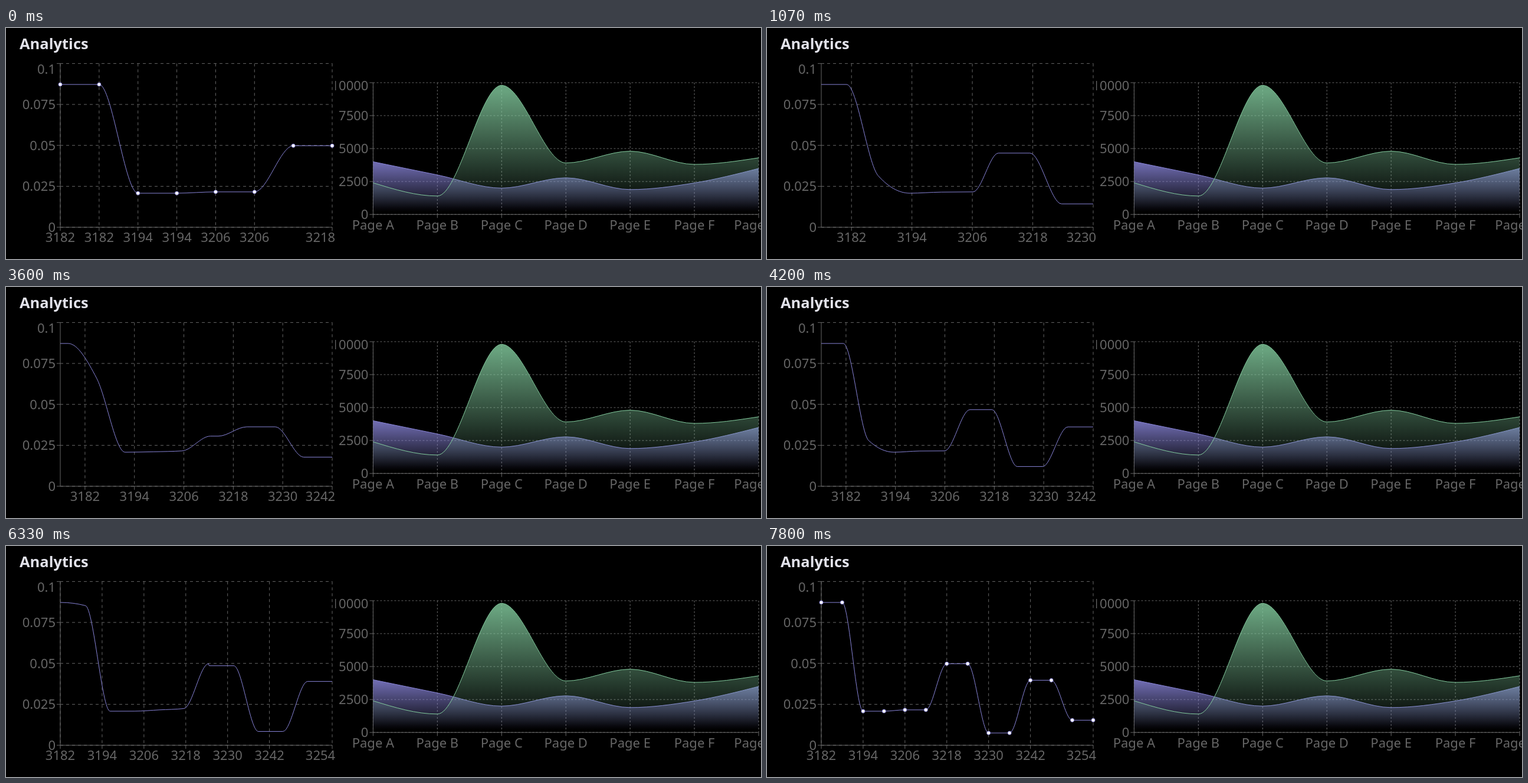
Recreate the animation shown at these times as an HTML page with a canvas. Size 1280x393 px, loop 8 s.

```html
<!DOCTYPE html>
<html>
<head>
<meta charset="utf-8">
<style>
html, body { margin: 0; background: #000; overflow: hidden; }
canvas { display: block; }
</style>
</head>
<body>
<canvas id="stage" width="1280" height="393"></canvas>
<script>
const ctx = document.getElementById('stage').getContext('2d');
const LOOP = 8000, DURATION = 1500;
const GRAY = '#666', PURPLE = '#8884d8', GREEN = '#82ca9d';

const left = { x0: 92, x1: 553, y0: 60.4, y1: 339, max: 0.1, dash: [5, 5] };
const right = { x0: 622.4, x1: 1276, y0: 93, y1: 317.2, max: 10000, dash: [3, 3] };

// Each reading covers two neighbouring points.
const readings = [0.0872, 0.0208, 0.0216, 0.0498, 0.0075, 0.0397, 0.0153];
// axis: when labels switch; start: when the line begins to move.
const stages = [
  { axis: -9000, start: -9000, count: 8, ticks: [0, 1, 2, 3, 4, 5, 7] },
  { axis: 195, start: 260, count: 10, ticks: [1, 3, 5, 7, 9] },
  { axis: 3262, start: 3285, count: 12, ticks: [1, 3, 5, 7, 9, 11] },
  { axis: 6195, start: 6262, count: 14, ticks: [0, 2, 4, 6, 8, 10, 13] },
];
const uv = [4000, 3000, 2000, 2780, 1890, 2390, 3490];
const pv = [2400, 1398, 9800, 3908, 4800, 3800, 4300];

const plot = (c, values) => values.map((v, i) => ({
  x: c.x0 + (c.x1 - c.x0) * i / (values.length - 1),
  y: c.y1 - (c.y1 - c.y0) * v / c.max,
}));

const linePoints = count =>
  plot(left, Array.from({ length: count }, (_, i) => readings[i >> 1]));

// cubic-bezier(.25, .1, .25, 1)
function ease(p) {
  if (p <= 0) return 0;
  if (p >= 1) return 1;
  const curve = (s, a, b) => 3 * (1 - s) * (1 - s) * s * a + 3 * (1 - s) * s * s * b + s * s * s;
  let lo = 0, hi = 1;
  for (let i = 0; i < 24; i++) {
    const mid = (lo + hi) / 2;
    if (curve(mid, 0.25, 0.25) < p) lo = mid; else hi = mid;
  }
  return curve(lo, 0.1, 1);
}

// Every point travels from the proportionally matching earlier point.
function morph(from, to, k) {
  return to.map((p, i) => {
    const q = from[Math.floor(i * from.length / to.length)];
    return { x: q.x + (p.x - q.x) * k, y: q.y + (p.y - q.y) * k };
  });
}

function monotonePath(input) {
  const pts = input.filter((p, i) => !i || p.x - input[i - 1].x > 1e-6);
  const last = pts.length - 1;
  const h = [], s = [];
  for (let i = 0; i < last; i++) {
    h[i] = pts[i + 1].x - pts[i].x;
    s[i] = (pts[i + 1].y - pts[i].y) / h[i];
  }
  const m = pts.map((_, i) => {
    if (!i || i === last) return 0;
    const a = s[i - 1], b = s[i];
    const mean = (a * h[i] + b * h[i - 1]) / (h[i - 1] + h[i]);
    return (Math.sign(a) + Math.sign(b)) * Math.min(Math.abs(a), Math.abs(b), Math.abs(mean) / 2);
  });
  m[0] = (3 * s[0] - m[1]) / 2;
  m[last] = (3 * s[last - 1] - m[last - 1]) / 2;
  const path = new Path2D();
  path.moveTo(pts[0].x, pts[0].y);
  for (let i = 0; i < last; i++) {
    const a = pts[i], b = pts[i + 1], d = h[i] / 3;
    path.bezierCurveTo(a.x + d, a.y + d * m[i], b.x - d, b.y - d * m[i + 1], b.x, b.y);
  }
  return path;
}

function segment(x0, y0, x1, y1, dash = []) {
  ctx.setLineDash(dash);
  ctx.strokeStyle = GRAY;
  ctx.beginPath();
  ctx.moveTo(x0, y0);
  ctx.lineTo(x1, y1);
  ctx.stroke();
  ctx.setLineDash([]);
}

function text(str, x, y, align) {
  ctx.textAlign = align;
  ctx.fillText(str, x, y);
}

function frame(c, xs, labels, labelY, lastX, topShift) {
  const step = (c.y1 - c.y0) / 4;
  ctx.font = '22px "Noto Sans", "Open Sans", sans-serif';
  ctx.fillStyle = GRAY;
  for (let i = 0; i <= 4; i++) {
    const y = c.y1 - step * i;
    segment(c.x0, y, c.x1, y, c.dash);
    segment(c.x0 - 6, y, c.x0, y);
    text(+(c.max * i / 4).toFixed(3), c.x0 - 8, y + 8 + (i === 4 ? topShift : 0), 'right');
  }
  xs.forEach((x, i) => {
    segment(x, c.y0, x, c.y1, c.dash);
    segment(x, c.y1, x, c.y1 + 6);
    text(labels[i], i === xs.length - 1 ? lastX : x, labelY, 'center');
  });
  segment(c.x0, c.y0, c.x0, c.y1);
  segment(c.x0, c.y1, c.x1, c.y1);
}

function strokeCurve(path, color) {
  ctx.strokeStyle = color;
  ctx.stroke(path);
}

function area(values, color) {
  const pts = plot(right, values);
  const line = monotonePath(pts);
  const shape = new Path2D(line);
  shape.lineTo(right.x1, right.y1);
  shape.lineTo(right.x0, right.y1);
  const fill = ctx.createLinearGradient(0, Math.min(...pts.map(p => p.y)), 0, right.y1);
  fill.addColorStop(0.05, color + 'cc');
  fill.addColorStop(0.95, color + '00');
  ctx.fillStyle = fill;
  ctx.fill(shape);
  strokeCurve(line, color);
}

function drawLineChart(t) {
  const index = stages.findLastIndex(s => t >= s.axis);
  const stage = stages[index];
  const target = linePoints(stage.count);
  const progress = (t - stage.start) / DURATION;
  frame(left, stage.ticks.map(i => target[i].x),
    stage.ticks.map(i => 3182 + 12 * (i >> 1)), 364, 533, 10);
  const points = index ? morph(linePoints(stages[index - 1].count), target, ease(progress)) : target;
  strokeCurve(monotonePath(points), PURPLE);
  if (progress < 1) return;
  ctx.fillStyle = '#fff';
  for (const p of points) {
    ctx.beginPath();
    ctx.arc(p.x, p.y, 3, 0, 2 * Math.PI);
    ctx.fill();
    ctx.stroke();
  }
}

function drawAreaChart() {
  ctx.save();
  ctx.beginPath();
  ctx.rect(558, 0, 730, 393);
  ctx.clip();
  frame(right, plot(right, uv).map(p => p.x), [...'ABCDEFG'].map(c => 'Page ' + c), 343, 1271, 4.5);
  area(uv, PURPLE);
  area(pv, GREEN);
  ctx.restore();
}

function draw(now) {
  ctx.fillStyle = '#000';
  ctx.fillRect(0, 0, 1280, 393);
  ctx.lineWidth = 1;
  ctx.fillStyle = '#e2e2ea';
  ctx.font = 'bold 25.5px "Noto Sans", "Open Sans", sans-serif';
  text('Analytics', 23, 36, 'left');
  drawLineChart((now - begin) % LOOP);
  drawAreaChart();
  requestAnimationFrame(() => draw(performance.now()));
}

const begin = performance.now();
draw(begin);
</script>
</body>
</html>
```
